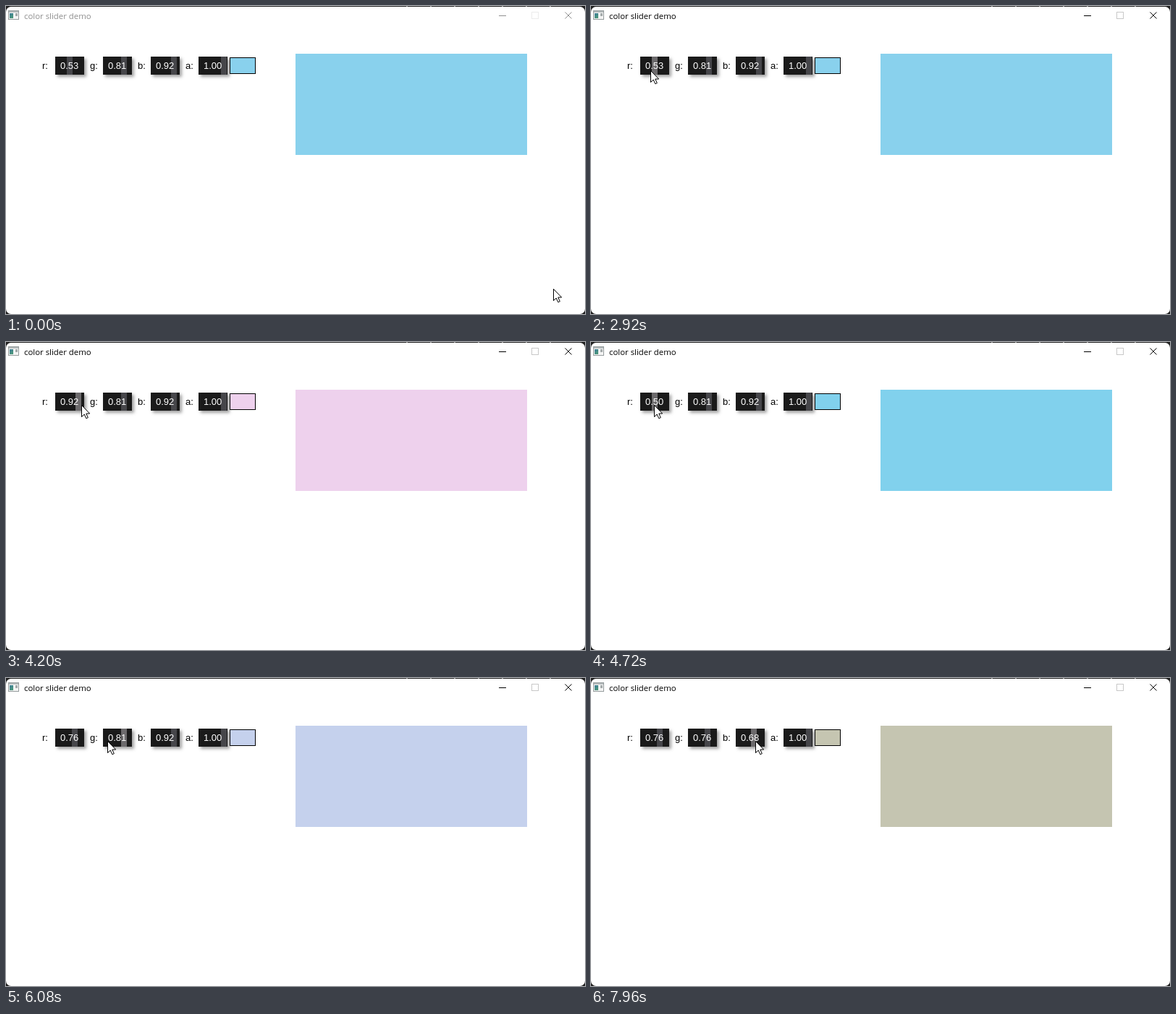
An HTML page with a canvas that plays this animation: 800x426 px, repeating every 8 s.

```html
<!DOCTYPE html>
<html lang="en">
<head>
<meta charset="utf-8">
<title>color slider demo</title>
<style>
html, body { margin: 0; width: 100%; height: 100%; overflow: hidden; background: #fff; }
canvas { display: block; }
</style>
</head>
<body>
<canvas id="stage" width="800" height="426"></canvas>
<script>
const ctx = document.getElementById('stage').getContext('2d');
const LOOP = 8000, TICK = 40, ACTIVATED = 2320;
const STEPS = 38, DRAG_Y = 87;
const UI_FONT = '11.4px "Open Sans", sans-serif';
const LABEL_FONT = '13px "Liberation Sans", Arial, sans-serif';

const turn = (time, value) => ({ time, value });

// Each drag begins at its first turn and eases from one value to the next.
const sliders = [
  { label: 'r:', turns: [turn(3080, 0.53), turn(4200, 0.92), turn(5040, 0.24), turn(5800, 0.76)] },
  { label: 'g:', turns: [turn(6280, 0.81), turn(6760, 0.24), turn(7320, 0.76)] },
  { label: 'b:', turns: [turn(7640, 0.92), turn(7920, 0.68)] },
  { label: 'a:', turns: [turn(LOOP, 1)] }
].map((s, i) => ({ ...s, x: 68 + 66 * i }));

const approach = [
  { time: 0, x: 756, y: 391 },
  { time: 1560, x: 73, y: 91 },
  { time: 2920, x: 82, y: 89 }
];

const path = approach.concat(sliders.flatMap(s =>
  s.turns.map(({ time, value }) => ({ time, x: s.x + 1 + STEPS * value, y: DRAG_Y }))));

function pointerAt(t) {
  const i = Math.max(1, path.findIndex(p => p.time >= t));
  const from = path[i - 1], to = path[i];
  // The last stop is the resting place until the loop restarts.
  if (to.time === LOOP) return { x: Math.round(from.x), y: from.y };
  const k = (t - from.time) / (to.time - from.time);
  const e = k * k * (3 - 2 * k);
  return {
    x: Math.round(from.x + (to.x - from.x) * e),
    y: Math.round(from.y + (to.y - from.y) * e)
  };
}

function valueAt({ x, turns }, t) {
  const press = turns[0], release = turns[turns.length - 1];
  if (t <= press.time) return press.value;
  const pointer = pointerAt(Math.min(t - TICK, release.time));
  return (pointer.x - x - 1) / STEPS;
}

function rect(color, x, y, w, h) {
  ctx.fillStyle = color;
  ctx.fillRect(x, y, w, h);
}

function text(str, x, y, color, font) {
  ctx.fillStyle = color;
  ctx.font = font;
  ctx.fillText(str, x, y);
}

function frame(color, x, y, w, h) {
  ctx.strokeStyle = color;
  ctx.lineWidth = 1;
  ctx.strokeRect(x + 0.5, y + 0.5, w - 1, h - 1);
}

const cross = new Path2D('M772.5 8.5l9 9M781.5 8.5l-9 9');
const arrow = new Path2D('M.5 .5V16.5L4.2 13 6.8 18.7 9.3 17.6 6.8 12H11.7Z');

function drawIcon() {
  rect('#f4f4f4', 3, 6, 15, 13);
  frame('#959c9d', 3, 6, 15, 13);
  rect('#b4babb', 4, 7, 13, 2);
  const shade = ctx.createLinearGradient(5, 10, 10, 17);
  shade.addColorStop(0, '#3f7f9c');
  shade.addColorStop(1, '#4c9a72');
  rect(shade, 5, 10, 5, 7);
  rect('#a5aaab', 13, 10, 3, 4);
}

function drawWindow(active) {
  const ink = active ? '#000' : '#8f8f8f';
  rect('#202020', 0, 0, 800, 426);
  for (let x = 553; x < 760; x += 33) rect('#8a8a8a', x, 0, 2, 1);
  ctx.fillStyle = '#fff';
  ctx.beginPath();
  ctx.roundRect(0, 1, 800, 425, 7);
  ctx.fill();

  drawIcon();
  text('color slider demo', 25, 18, ink, UI_FONT);
  rect(ink, 681, 13, 10, 1);
  frame(active ? '#c8c8c8' : '#ececec', 726, 8, 10, 10);
  ctx.strokeStyle = ink;
  ctx.lineWidth = 1;
  ctx.stroke(cross);
}

function drawSlider({ label, x }, value, hover) {
  text(label, x - 18, 87, '#000', LABEL_FONT);
  ctx.save();
  ctx.shadowColor = 'rgba(0,0,0,.36)';
  ctx.shadowBlur = 4;
  ctx.shadowOffsetX = ctx.shadowOffsetY = 3;
  rect('#1a1a1a', x, 70, 40, 25);
  ctx.restore();
  rect(hover ? '#6c6a6c' : '#46464a', x + Math.floor(1 + 30 * value), 70, 8, 25);
  text(value.toFixed(2), x + 7, 87, '#fff', LABEL_FONT);
}

function drawPointer({ x, y }) {
  ctx.save();
  ctx.translate(x, y);
  ctx.fillStyle = '#fff';
  ctx.strokeStyle = '#000';
  ctx.lineWidth = 1;
  ctx.fill(arrow);
  ctx.stroke(arrow);
  ctx.restore();
}

function draw(t) {
  const pointer = pointerAt(t);
  const values = sliders.map(s => valueAt(s, t));
  const [r, g, b] = values.map(v => Math.min(255, Math.round(258 * v)));
  const color = `rgb(${r},${g},${b})`;
  const inRow = pointer.y >= 70 && pointer.y < 95;

  drawWindow(t >= ACTIVATED);
  sliders.forEach((s, i) =>
    drawSlider(s, values[i], inRow && pointer.x >= s.x && pointer.x < s.x + 40));
  rect(color, 309, 71, 36, 23);
  frame('#000', 309, 71, 36, 23);
  rect(color, 400, 66, 320, 140);
  drawPointer(pointer);
}

const begin = performance.now();
function tick() {
  const t = (performance.now() - begin) % LOOP;
  draw(Math.floor(t / TICK) * TICK);
  requestAnimationFrame(tick);
}
tick();
</script>
</body>
</html>
```
